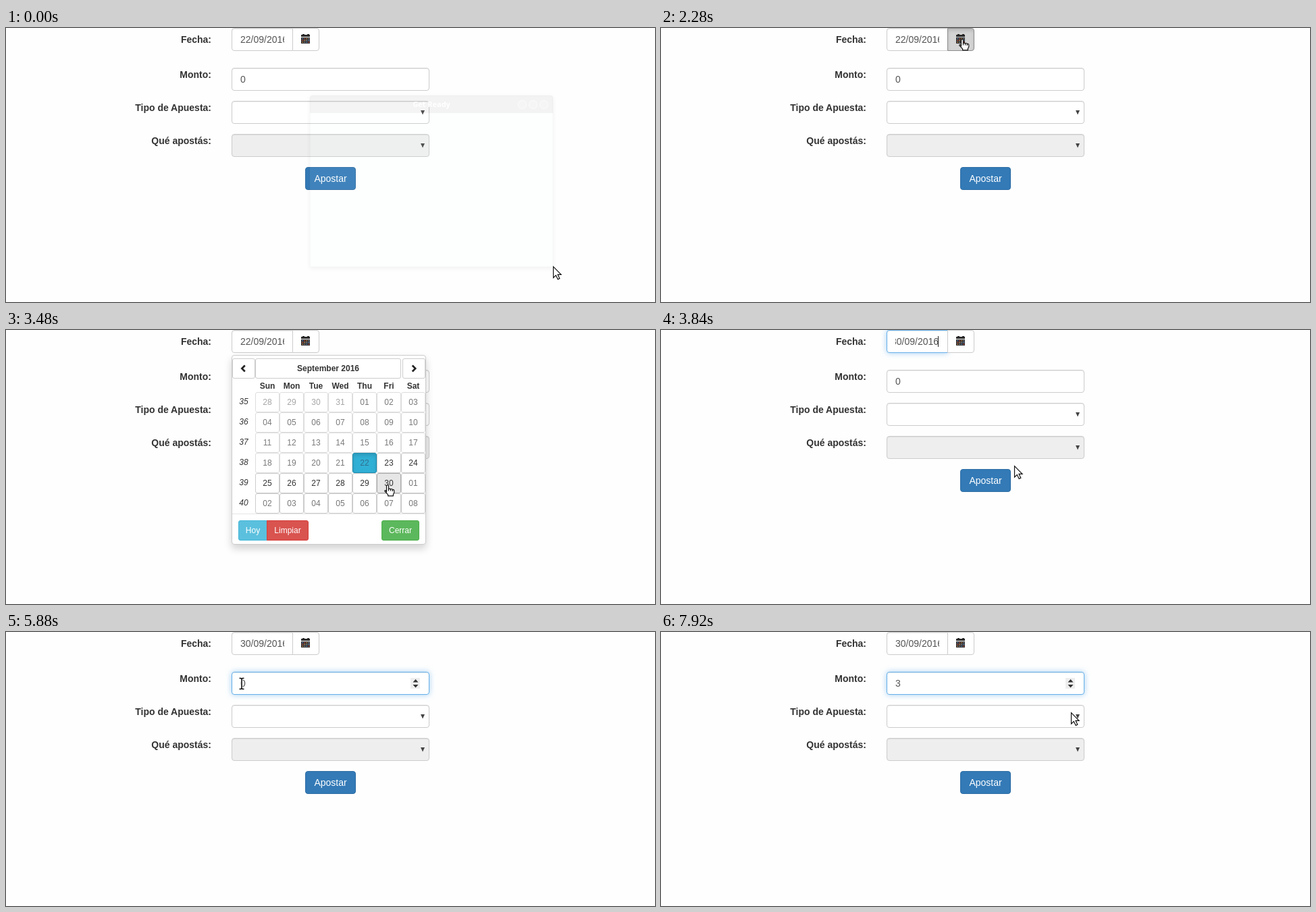
These frames come from a looping animation (961x406 px, 8 s). An HTML page:

```html
<!DOCTYPE html>
<html lang="es">
<head>
<meta charset="utf-8">
<title>Apuesta</title>
<style>
html, body { margin: 0; width: 100%; height: 100%; overflow: hidden; background: #fefefe; }
body { font: 14px "Liberation Sans", Arial, sans-serif; color: #333; }
div, svg { position: absolute; left: 0; top: 0; }
svg { width: 961px; height: 406px; }
.box { box-sizing: border-box; border: 1px solid transparent; white-space: nowrap; text-align: center; }
.label { font-weight: bold; text-align: right; }
.input { background: #fff; border-color: #ccc; border-radius: 4px; box-shadow: inset 0 1px 1px rgba(0,0,0,.075); }
.date { border-radius: 4px 0 0 4px; }
.disabled { background: #eee; }
.focus { border-color: #66afe9; box-shadow: inset 0 1px 1px rgba(0,0,0,.075), 0 0 8px rgba(102,175,233,.6); }
.value { color: #555; text-align: left; overflow: hidden; }
.value.end { text-indent: -6px; }
.selected span { background: #4a90d9; color: #fff; }
.caret { background: #222; border: 0; }
.btn { background: #fff; border-color: #ccc; border-radius: 4px; }
.addon { border-radius: 0 4px 4px 0; }
.hover { background: #e6e6e6; border-color: #adadad; }
.active { background: #d4d4d4; border-color: #8c8c8c; box-shadow: inset 0 3px 5px rgba(0,0,0,.125); }
.primary { background: #337ab7; border-color: #2e6da4; color: #fff; }
.panel { background: #fff; border-color: #ccc; border-radius: 4px; box-shadow: 0 6px 12px rgba(0,0,0,.175); }
.small { font-size: 12px; border-radius: 3px; }
.bold { font-weight: bold; }
.week { font-style: italic; }
.past { opacity: .65; }
.muted { color: #777; }
.today { background: #31b0d5; border-color: #1f8eb0; color: #31708f; box-shadow: inset 0 3px 5px rgba(0,0,0,.125); }
.rule { background: #e5e5e5; border: 0; }
.info { background: #5bc0de; border-color: #46b8da; color: #fff; border-radius: 3px 0 0 3px; }
.danger { background: #d9534f; border-color: #d43f3a; color: #fff; border-radius: 0 3px 3px 0; }
.success { background: #5cb85c; border-color: #4cae4c; color: #fff; }
.ghost { background: rgba(240,245,245,.07); border-color: rgba(0,0,0,.02); border-radius: 4px 4px 0 0; box-shadow: 0 2px 7px rgba(0,0,0,.06); }
.titlebar { background: rgba(80,70,70,.06); border-radius: 4px 4px 0 0; color: #fff; font: bold 11px "Open Sans", sans-serif; }
.dot { border-color: rgba(255,255,255,.6); border-radius: 50%; background: rgba(255,255,255,.2); }
</style>
</head>
<body>
<script>
function layer() {
  const root = document.createElement('div');
  document.body.append(root);
  return {
    root,
    box(cls, x, y, w, h, text = '') {
      const el = document.createElement('div');
      el.className = 'box ' + cls;
      el.style.cssText = `left:${x}px;top:${y}px;width:${w}px;height:${h}px;line-height:${h - 2}px`;
      el.textContent = text;
      root.append(el);
      return el;
    },
    icon(markup) {
      root.insertAdjacentHTML('beforeend', `<svg>${markup}</svg>`);
      return root.lastElementChild;
    }
  };
}

// Form
const page = layer();
[['Fecha:', 7], ['Monto:', 59], ['Tipo de Apuesta:', 108], ['Qué apostás:', 157]]
  .forEach(([text, y]) => page.box('label', 100, y, 205, 20, text));
const dateInput = page.box('input date', 334, 0, 91, 34);
const dateButton = page.box('btn addon', 424, 0, 40, 34);
const dateValue = page.box('value', 346, 0, 67, 34);
const dateCaret = page.box('caret', 410, 9, 1, 16);
const amountInput = page.box('input', 334, 59, 293, 34);
const amountValue = page.box('value', 346, 59, 60, 34);
const amountDigit = amountValue.appendChild(document.createElement('span'));
const amountCaret = page.box('caret', 355, 68, 1, 16);
page.box('input', 334, 108, 293, 34);
page.box('input disabled', 334, 157, 293, 34);
page.box('btn primary', 443, 206, 75, 34, 'Apostar');

const dotColors = ['#6d93c8', '#c8584c', '#d89a58', '#8e9aa8'];
let dots = '';
for (let i = 0; i < 12; i++) {
  dots += `<rect x="${438.5 + i % 4 * 3}" y="${15 + (i >> 2) * 2.7}" width="1.7" height="1.4" fill="${dotColors[(i + (i >> 2)) % 4]}"/>`;
}
page.icon(`<path d="M437 10h2V9h3v1h4V9h3v1h1v3h-13zM437 14h13v9h-13z" fill="#2b2b2b"/>${dots}
  <path d="M614 122h6l-3 6.5zM614 171h6l-3 6.5z" fill="#444"/>`);
const spinner = page.icon(`<path d="M599 68h14v16h-14z" fill="#eee"/>
  <path d="M602.5 74.5h8l-4-4.5zM602.5 78h8l-4 4.5z" fill="#333"/>`);

// Fading window
const ghost = layer();
ghost.box('ghost', 450, 100, 360, 254);
ghost.box('titlebar', 450, 100, 360, 26, 'Get Ready');
[758, 774, 790].forEach(x => ghost.box('dot', x, 107, 13, 13));

// Date picker
const popup = layer();
popup.box('panel', 334, 37, 288, 281);
popup.box('btn small', 335, 42, 34, 30);
const monthButton = popup.box('btn small bold', 369, 42, 216, 30, 'September 2016');
popup.box('btn small', 587, 42, 34, 30);
popup.icon('<path d="M353.8 52.5l-4.5 4.5 4.5 4.5M601.7 52.5l4.5 4.5-4.5 4.5" fill="none" stroke="#222" stroke-width="2.6"/>');
['Sun', 'Mon', 'Tue', 'Wed', 'Thu', 'Fri', 'Sat']
  .forEach((day, i) => popup.box('small bold', 369 + 36 * i, 73, 36, 20, day));
let lastDay;
for (let i = 0; i < 42; i++) {
  const col = i % 7, row = Math.floor(i / 7), y = 92 + 30 * row;
  const day = new Date(2016, 7, 28 + i).getDate();
  if (!col) popup.box('small week', 335, y - 1, 34, 30, 35 + row);
  const cls = (i < 25 ? 'past ' : '') + (i < 4 || i > 33 ? 'muted' : '');
  const cell = popup.box('btn small ' + (i === 25 ? 'today' : cls), 369 + 36 * col, y, 36, 30, String(day).padStart(2, '0'));
  if (i === 33) lastDay = cell;
}
popup.box('rule', 335, 272, 286, 1);
popup.box('btn small info', 344, 282, 43, 30, 'Hoy');
popup.box('btn small danger', 386, 282, 62, 30, 'Limpiar');
popup.box('btn small success', 556, 282, 56, 30, 'Cerrar');

// Pointers
const top_ = layer();
top_.icon(`<g id="arrow"><path d="M.5.7V17l3.8-3.6 2.9 6 2.6-1.2-2.8-5.9h5z" fill="#fff" stroke="#111" stroke-width="1.2"/></g>
  <g id="beam" fill="none"><path d="M-3.5-7.5h2.2L0-6.5l1.3-1h2.2M0-6.5v14M-3.5 8.5h2.2L0 7.5l1.3 1h2.2" stroke="#fff" stroke-width="3"/>
    <path d="M-3.5-7.5h2.2L0-6.5l1.3-1h2.2M0-6.5v14M-3.5 8.5h2.2L0 7.5l1.3 1h2.2" stroke="#111" stroke-width="1.6"/></g>
  <g id="hand" stroke="#111" stroke-width="1.2" stroke-linejoin="round"><path d="M3.5 11V2q0-1.4 1.5-1.4T6.5 2v4.5q1.5-1 3 .3 1.5-.8 2.8.6 2.5-.4 2.5 2V12l-1.4 2.5v2.3H5.6v-2L1 10.2Q.3 8.7 2 8.5z" fill="#fff"/>
    <path d="M6.5 6v3.5M9.5 7v2.5M12.3 7.5V10" fill="none"/></g>`);
const pointers = ['arrow', 'beam', 'hand'].map(id => document.getElementById(id));

// Pointer route: time, x, y, shape
const route = [
  [0, 810, 353, 'arrow'], [480, 810, 353, 'arrow'], [840, 515, 157, 'arrow'], [960, 515, 157, 'arrow'],
  [1200, 432, 82, 'beam'], [1440, 414, 46, 'arrow'], [1560, 414, 46, 'arrow'], [1800, 428, 32, 'beam'],
  [1920, 441, 20, 'hand'], [2040, 441, 16, 'hand'], [2640, 441, 16, 'hand'], [3480, 560, 229, 'hand'],
  [3720, 560, 229, 'arrow'], [4320, 376, 87, 'beam'], [4440, 376, 87, 'beam'], [4680, 346, 82, 'beam'],
  [4800, 346, 82, 'beam'], [5040, 370, 79, 'beam'], [5280, 371, 81, 'beam'], [5760, 371, 81, 'beam'],
  [6120, 304, 65, 'beam'], [7320, 304, 65, 'beam'], [7680, 480, 96, 'arrow'], [7920, 607, 119, 'arrow']
];

// Element, then start and end times
const visible = [
  [ghost.root, 0, 120], [popup.root, 2520, 3720],
  [spinner, 1200, 1440, 4320, 8000],
  [dateCaret, 3720, 4320, 4920, 5520], [amountCaret, 6840, 7440]
];
const states = [
  [dateButton, 'hover', 1920, 2760], [dateButton, 'active', 2280, 2520],
  [monthButton, 'hover', 2760, 2880], [lastDay, 'hover', 3480, 3720],
  [dateInput, 'focus', 3720, 5880], [dateValue, 'end', 3720, 5880],
  [amountInput, 'focus', 5880, 8000], [amountValue, 'selected', 6000, 6840]
];
const within = (t, spans) => spans.some((from, i) => i % 2 === 0 && t >= from && t < spans[i + 1]);

function movePointer(t) {
  const i = route.findLastIndex(key => key[0] <= t);
  const [t0, x0, y0, shape] = route[i];
  const [t1, x1, y1] = route[i + 1] || route[i];
  const k = t1 > t0 ? (t - t0) / (t1 - t0) : 0;
  const x = Math.round(x0 + (x1 - x0) * k), y = Math.round(y0 + (y1 - y0) * k);
  for (const p of pointers) {
    p.style.display = p.id === shape ? '' : 'none';
    p.setAttribute('transform', `translate(${x} ${y})`);
  }
}

function draw(now) {
  const t = Math.floor(now % 8000 / 120) * 120;
  for (const [el, ...spans] of visible) el.style.display = within(t, spans) ? '' : 'none';
  for (const [el, cls, ...spans] of states) el.classList.toggle(cls, within(t, spans));
  dateValue.textContent = (t < 3720 ? '22' : '30') + '/09/2016';
  amountDigit.textContent = t < 6840 ? '0' : '3';
  movePointer(t);
}

const start = performance.now();
function tick() {
  draw(performance.now() - start);
  requestAnimationFrame(tick);
}
tick();
</script>
</body>
</html>
```
